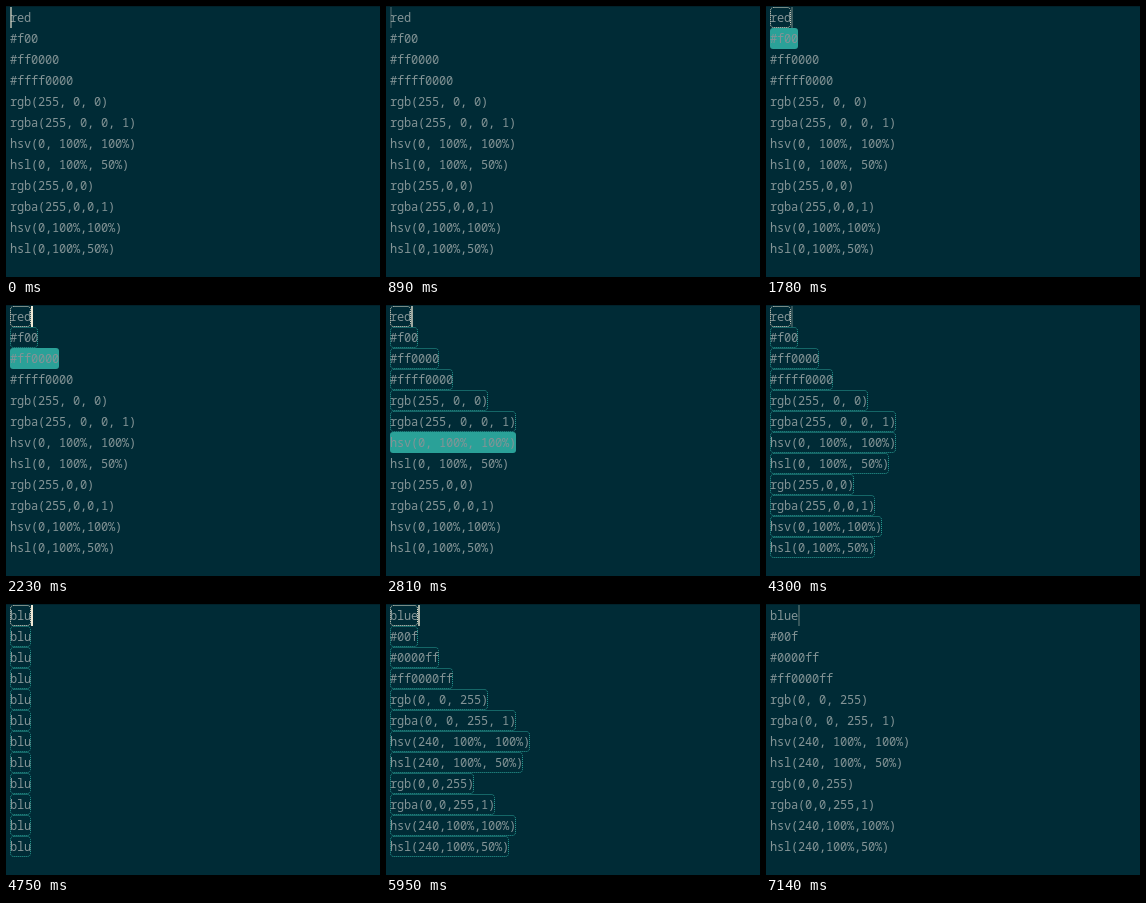
Animation, 374 px wide and 271 px high, one loop 7.24 s. Source, as an HTML page with a canvas:

```html
<!DOCTYPE html>
<html>
<head>
<meta charset="utf-8">
<style>
  html, body { margin: 0; width: 100%; height: 100%; overflow: hidden; background: #002b36; }
  canvas { display: block; }
</style>
</head>
<body>
<canvas id="stage" width="374" height="271"></canvas>
<script>
const ctx = document.getElementById('stage').getContext('2d');
const LOOP = 7240, LEFT = 4, TOP = 1, CHAR = 7, ROW = 21;
const TEAL = '#2aa198', CREAM = '#eee8d5', GREY = '#839496';

const RED = ['red', '#f00', '#ff0000', '#ffff0000',
  'rgb(255, 0, 0)', 'rgba(255, 0, 0, 1)', 'hsv(0, 100%, 100%)', 'hsl(0, 100%, 50%)',
  'rgb(255,0,0)', 'rgba(255,0,0,1)', 'hsv(0,100%,100%)', 'hsl(0,100%,50%)'];
const BLUE = ['blue', '#00f', '#0000ff', '#ff0000ff',
  'rgb(0, 0, 255)', 'rgba(0, 0, 255, 1)', 'hsv(240, 100%, 100%)', 'hsl(240, 100%, 50%)',
  'rgb(0,0,255)', 'rgba(0,0,255,1)', 'hsv(240,100%,100%)', 'hsl(240,100%,50%)'];

// The screen refreshes every 150 ms, with a few steps 10 ms shorter.
const SHORT_STEPS = [5, 8, 18, 19, 29, 48];
const stepTime = n => 150 * n - 10 * SHORT_STEPS.filter(s => s <= n).length;

function stepAt(time) {
  let n = 48;
  while (n > 0 && stepTime(n) > time) n--;
  return n;
}

function linesAt(n) {
  if (n < 30) return RED;
  if (n < 33) return RED.map(() => 'blu'.slice(0, n - 29));
  return BLUE;
}

// Row being added: a key press, a pause, then key repeat.
function activeRow(n) {
  if (n < 11 || n > 24) return -1;
  if (n === 11) return 0;
  return Math.max(1, n - 13);
}

function outlinedRows(n) {
  if (n < 11 || n >= 42) return 0;
  return n < 25 ? activeRow(n) : 12;
}

// The caret stays solid after input, then pulses smoothly.
function caretAlpha(time) {
  const holds = [[4450, 5360], [3710, 3870], [1330, 1490], [0, -185]];
  const fadeStart = holds.find(([from]) => time >= from)[1];
  const phase = Math.max(0, time - fadeStart) / 740;
  return 0.58 + 0.42 * Math.cos(2 * Math.PI * phase);
}

function rowBox(row, text, inset) {
  ctx.beginPath();
  ctx.roundRect(LEFT + inset, TOP + row * ROW + inset,
    text.length * CHAR - 2 * inset, ROW - 2 * inset, 3);
}

function draw(time) {
  const n = stepAt(time);
  const lines = linesAt(n);
  const active = activeRow(n);
  const outlined = outlinedRows(n);

  ctx.fillStyle = '#002b36';
  ctx.fillRect(0, 0, 374, 271);
  ctx.fillStyle = '#01222b';
  ctx.fillRect(0, 0, 374, 1);

  ctx.font = '12px "Noto Sans Mono", monospace';
  ctx.letterSpacing = '-0.2px';
  ctx.lineWidth = 1;
  ctx.setLineDash([1, 1]);
  lines.forEach((text, row) => {
    if (row === active) {
      rowBox(row, text, 0);
      ctx.fillStyle = TEAL;
      ctx.fill();
    } else if (row < outlined) {
      rowBox(row, text, 0.5);
      ctx.strokeStyle = row === 0 ? CREAM : TEAL;
      ctx.stroke();
    }
    ctx.fillStyle = GREY;
    ctx.fillText(text, LEFT, TOP + row * ROW + 15);
  });

  const column = n < 8 ? 0 : lines[0].length;
  ctx.globalAlpha = caretAlpha(stepTime(n));
  ctx.fillStyle = CREAM;
  ctx.fillRect(LEFT + column * CHAR, TOP, 2, ROW);
  ctx.globalAlpha = 1;
}

const start = performance.now();
function tick() {
  draw((performance.now() - start) % LOOP);
  requestAnimationFrame(tick);
}
tick();
</script>
</body>
</html>
```
